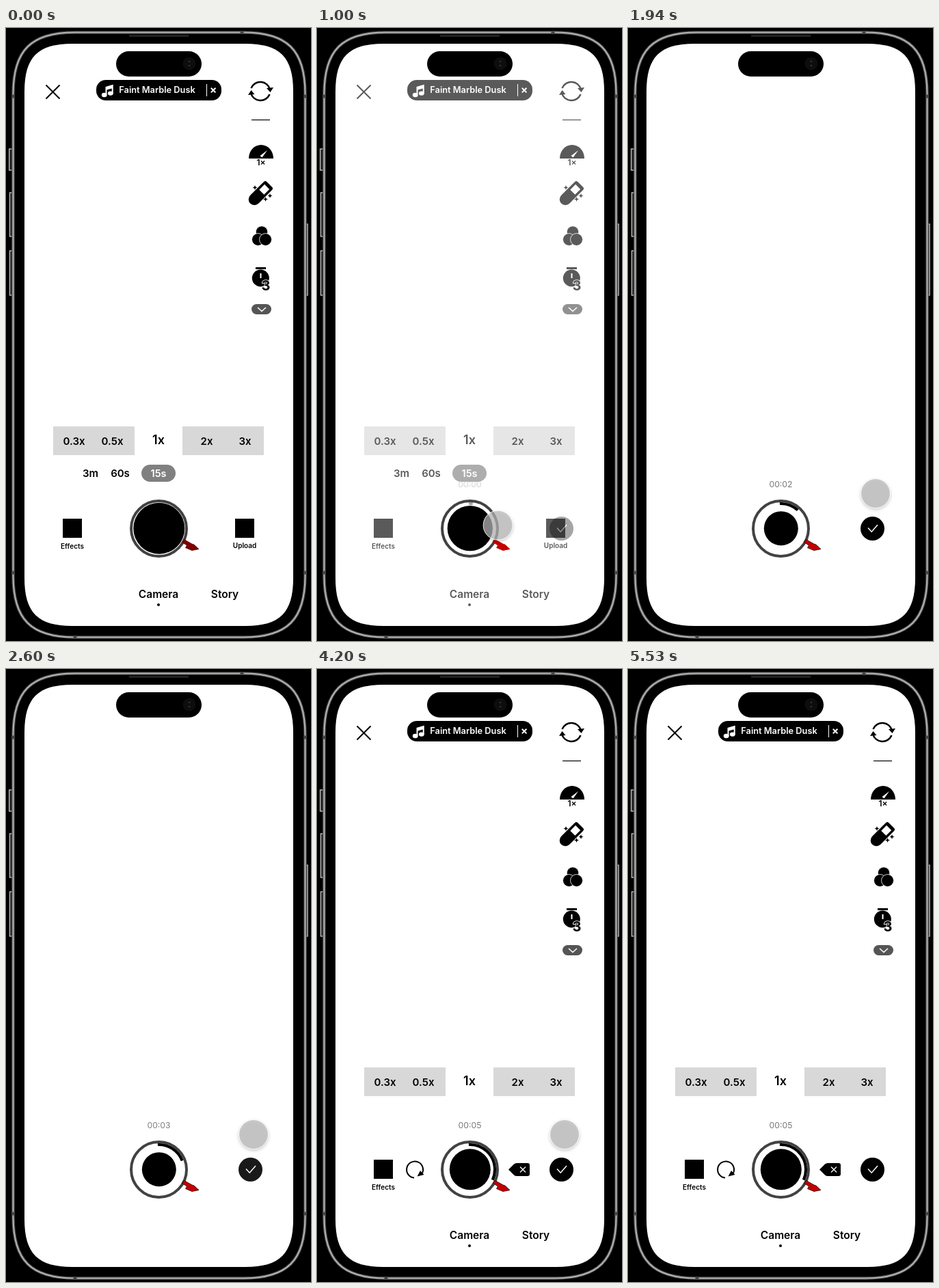
These frames come from a looping animation (446 px wide and 897 px high, 5.94 s). An HTML page:

```html
<!DOCTYPE html>
<html lang="en">
<head>
<meta charset="utf-8">
<title>Camera recording</title>
<style>
  html, body { margin: 0; width: 100%; height: 100%; overflow: hidden; background: #000; }
  svg { display: block; width: 446px; height: 897px; }
  text { font: 600 15px Inter, "Open Sans", sans-serif; text-anchor: middle; }
  .line { fill: none; stroke: #000; stroke-width: 2; }
  .white { stroke: #fff; }
  .timer { font-weight: 400; font-size: 12.2px; fill: #777; }
  .hollow { fill: #fff; stroke: #999; stroke-width: .7; }
  #touch { filter: drop-shadow(0 2px 2px rgba(0, 0, 0, .25)); }
</style>
</head>
<body>
<svg viewBox="0 0 446 897">
  <!-- phone body -->
  <g fill="#222" stroke="#b4b4b4" stroke-width="1.5">
    <rect x="4.7" y="177" width="5" height="31"/>
    <rect x="5.5" y="241" width="5" height="64"/>
    <rect x="5.5" y="326" width="5" height="65"/>
    <rect x="436" y="287" width="5" height="104"/>
  </g>
  <path id="rim" stroke="#4a4a4a" stroke-width="4.5"/>
  <path id="shine" fill="none" stroke="#b4b4b4" stroke-width="2"/>
  <path d="M8 100h5M435 100h5M8 797h5M435 797h5M345 4v5M101 889v5" stroke="#444" stroke-width="5"/>
  <path d="M180 11.5h87" stroke="#222" stroke-width="3"/>
  <path id="screen" fill="#fff"/>
  <rect x="161" y="34" width="125" height="37" rx="18.5"/>
  <circle cx="268" cy="52" r="9.5" fill="#0d0d0d"/>
  <path d="M268 48v2M268 54v2" stroke="#333" stroke-width="2.5"/>

  <!-- camera controls -->
  <g id="controls">
    <path class="line" d="M58.5 83.5l20 20m0-20l-20 20"/>
    <rect x="132" y="76" width="183" height="30" rx="14"/>
    <g fill="#fff">
      <ellipse cx="143.7" cy="98" rx="3.9" ry="3.2"/>
      <ellipse cx="152.8" cy="95.6" rx="3.9" ry="3.2"/>
      <path d="M145.5 98V86l11.2-3.2V96h-2v-7.6l-7.2 2V98Z"/>
      <text x="221" y="95" style="font-size:12.8px">Faint Marble Dusk</text>
    </g>
    <path class="line white" d="M299.8 87.8l6.6 6.6m0-6.6l-6.6 6.6"/>
    <path class="line white" style="stroke-width:1" d="M293.5 82v18"/>

    <path class="line" style="stroke-width:2.5" d="M358.5 88a14.5 14.5 0 0 1 27.5 2M385.5 97a14.5 14.5 0 0 1-27.5-2"/>
    <path d="M354 98l4.5-7 5 6ZM381 88l10-1-4.5 7Z"/>
    <path class="line" style="stroke-width:1.2" d="M359 134.5h27"/>

    <path d="M355 191a18 20 0 0 1 36 0Z"/>
    <path d="M371.5 187l10.5-8-7.5 10.5Z" fill="#fff"/>
    <text x="373" y="201" style="font-size:12px">1×</text>

    <g transform="rotate(45 371 243)">
      <path d="M362.5 226q0-3 3-3h11q3 0 3 3v28a8.5 8.5 0 0 1-17 0Z"/>
      <rect x="366" y="228" width="10" height="11" fill="#fff"/>
    </g>
    <path d="M364 230l1 2.5 2.5 1-2.5 1-1 2.5-1-2.5-2.5-1 2.5-1ZM379.5 247l1 2.5 2.5 1-2.5 1-1 2.5-1-2.5-2.5-1 2.5-1ZM386 242l1 2.5 2.5 1-2.5 1-1 2.5-1-2.5-2.5-1 2.5-1Z"/>

    <g stroke="#fff" stroke-width=".8">
      <circle cx="374" cy="298.5" r="8.7"/>
      <circle cx="368.5" cy="309.5" r="9"/>
      <circle cx="379.5" cy="309.5" r="9"/>
    </g>

    <path d="M365 350h15v3h-15Z"/>
    <circle cx="372.3" cy="366" r="12.5"/>
    <path class="line white" d="M372.5 359v7"/>
    <text x="380" y="384" style="font-size:20px;font-weight:700" stroke="#fff" stroke-width="1.6" paint-order="stroke">3</text>

    <rect x="359" y="404" width="29" height="15" rx="7.5" fill="#555"/>
    <path class="line white" style="stroke-width:1.6" d="M368 409l6 5.500 6-5.500"/>

    <path d="M69 583h119v42H69ZM258 583h119v42H258Z" fill="#d8d8d8"/>
    <text x="99.5" y="610">0.3x</text>
    <text x="155.5" y="610">0.5x</text>
    <text x="293.5" y="610">2x</text>
    <text x="349.5" y="610">3x</text>
    <text x="223" y="609" style="font-size:18px">1x</text>

    <rect x="83" y="718" width="28" height="28"/>
    <text x="97" y="762" style="font-size:10px">Effects</text>
    <text x="223" y="834" style="font-size:15.5px">Camera</text>
    <text x="320" y="834" style="font-size:15.5px">Story</text>
    <circle cx="223" cy="844" r="2"/>
  </g>

  <!-- only before recording -->
  <g id="before">
    <text x="123.5" y="657">3m</text>
    <text x="167" y="657">60s</text>
    <rect x="198" y="639" width="50" height="25" rx="12.5" fill="#808080"/>
    <text x="223" y="657" fill="#fff" style="font-size:14.5px">15s</text>
    <rect x="335" y="718" width="28" height="28"/>
    <text x="349" y="761" style="font-size:10px">Upload</text>
  </g>

  <!-- only after recording -->
  <g id="after">
    <path class="line" d="M142 744.5a12 12 0 1 1 11.5-6"/>
    <path d="M146.5 742.5l4.5-8.5 5.5 6Z"/>
    <path d="M280 732.5l8-8q2-1.5 4-1.5h16q3 0 3 3v13q0 3-3 3h-16q-2 0-4-1.5Z"/>
    <path class="line white" style="stroke-width:1.3" d="M297 728.5l8 8m0-8l-8 8"/>
  </g>

  <!-- shutter -->
  <circle cx="223.5" cy="732.5" r="40.5" fill="#fff" stroke="#424242" stroke-width="4"/>
  <circle id="disc" cx="223.8" cy="732.2"/>
  <circle id="arc" class="line" style="stroke-width:4" cx="223.5" cy="732.5" r="36.5" pathLength="360" transform="rotate(-92.5 223.5 732.5)"/>
  <path id="hand" d="M257.5 752.5L260.5 748.5 272 755 275 756 282 762.5 272 764.5 262.5 760.5 264.5 757Z" stroke-width=".8"/>

  <text id="old" class="timer" x="223.5" y="672"></text>
  <text id="new" class="timer" x="223.5" y="672"></text>

  <g id="check">
    <circle cx="357.5" cy="732.5" r="17.5"/>
    <path class="line white" style="stroke-width:1.5" d="M351 731.5l5.2 5.7 8.8-10.2"/>
  </g>
  <circle id="touch" r="21.5" fill="rgba(188,188,188,.7)" stroke="#fff" stroke-opacity=".9"/>
</svg>
<script>
  const LOOP = 5940, FPS = 15;
  const $ = id => document.getElementById(id);
  const mix = (a, b, p) => a + (b - a) * p;
  const easeOut = p => 1 - (1 - p) ** 1.7;
  const easeInOut = p => p < .5 ? 4 * p ** 3 : 1 - 4 * (1 - p) ** 3;

  // rectangle whose corners curve over length n, with handles c short of the corner
  function smoothRect(x, y, w, h, n, c) {
    const r = x + w, b = y + h;
    return `M${x} ${y + n}C${x} ${y + c} ${x + c} ${y} ${x + n} ${y}
      H${r - n}C${r - c} ${y} ${r} ${y + c} ${r} ${y + n}
      V${b - n}C${r} ${b - c} ${r - c} ${b} ${r - n} ${b}
      H${x + n}C${x + c} ${b} ${x} ${b - c} ${x} ${b - n}Z`;
  }
  $("rim").setAttribute("d", smoothRect(10.5, 6.5, 427, 885, 90, 26));
  $("shine").setAttribute("d", smoothRect(10.5, 6.5, 427, 885, 90, 26));
  $("screen").setAttribute("d", smoothRect(27, 23, 393, 852, 70, 19.5));

  // touch positions: off stage, shutter, button, resting
  const away = [415, 923], shutter = [219, 729], button = [349, 725], rest = [362, 681];
  const seconds = [0, 2, 3, 4, 5];
  const angle = s => Math.max(9, 24 * s - 3);

  function label(el, s, opacity) {
    el.textContent = "00:0" + s;
    el.classList.toggle("hollow", s === 0);
    el.style.opacity = opacity;
  }

  function draw(t) {
    const step = Math.floor(t * FPS / 1000 + .06);
    const part = (start, length) => Math.min(1, Math.max(0, (step - start) / length));

    const enter = easeOut(part(2, 9));
    const record = easeInOut(part(11, 9));
    const lift = easeOut(part(20, 9));
    const finish = easeOut(part(58, 5));
    const leave = easeOut(part(76, 7));

    const point = [0, 1].map(i => {
      let v = mix(away[i], shutter[i], enter);
      v = mix(v, button[i], record);
      v = mix(v, rest[i], lift);
      return mix(v, away[i], leave);
    });
    $("touch").setAttribute("cx", point[0]);
    $("touch").setAttribute("cy", point[1]);

    $("controls").style.opacity = Math.max(1 - record, finish);
    $("before").style.opacity = 1 - record;
    $("after").style.opacity = finish;
    $("disc").setAttribute("r", mix(mix(37.5, 25, record), 30, finish));

    // the counter cross-fades from one second to the next
    const count = part(20, 36) * 4;
    const i = Math.min(3, Math.floor(count)), p = count - i;
    label($("old"), seconds[i], record * (1 - p));
    label($("new"), seconds[i + 1], p);
    $("check").style.opacity = record * (1 - p * (1 - p));

    const sweep = mix(angle(seconds[i]), angle(seconds[i + 1]), p);
    $("arc").style.strokeDasharray = sweep + " 360";
    $("arc").style.opacity = record;

    $("hand").style.fill = step < 3 ? "#800000" : "#c40000";
    $("hand").style.stroke = step < 3 ? "#500" : record > .5 ? "#200" : "#c40000";
  }

  function frame() {
    draw(performance.now() % LOOP);
    requestAnimationFrame(frame);
  }
  frame();
</script>
</body>
</html>
```
